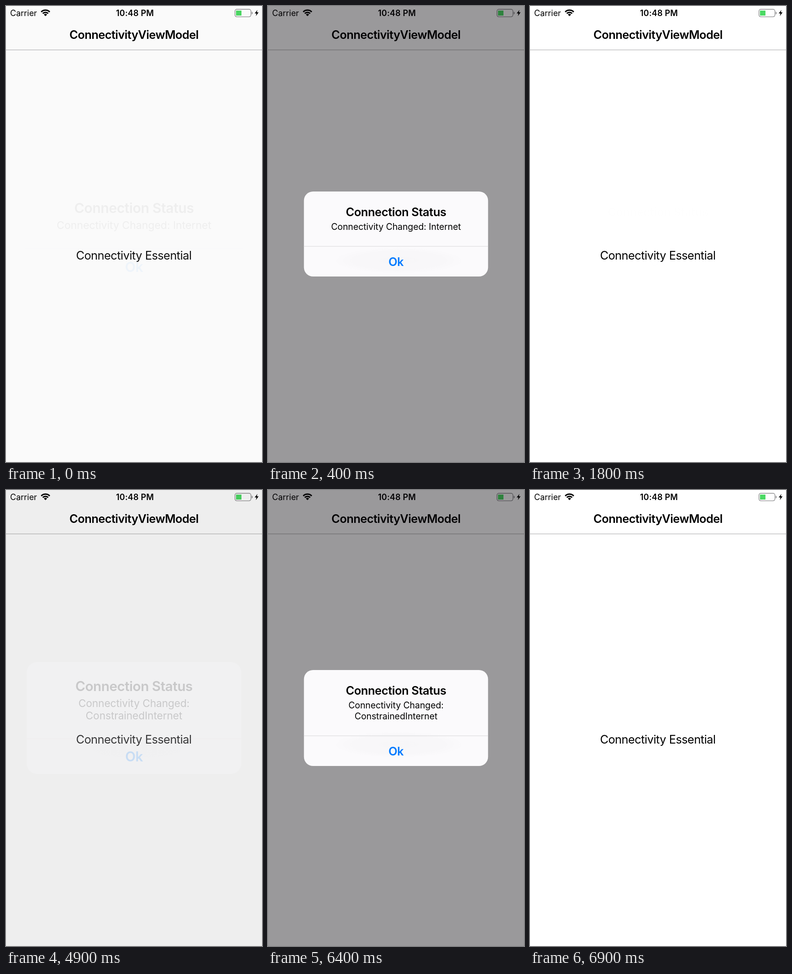
Animation of 561 by 998 pixels, one loop 8000 ms. Source, as an HTML page with a canvas:

```html
<!DOCTYPE html>
<html lang="en">
<head>
<meta charset="utf-8">
<title>Connectivity alert</title>
<style>
  html, body { margin: 0; width: 100%; height: 100%; overflow: hidden; background: #fff; }
  canvas { display: block; }
</style>
</head>
<body>
<canvas id="stage" width="561" height="998"></canvas>
<script>
const ctx = document.getElementById('stage').getContext('2d');
const W = 561, H = 998, CX = W / 2, CY = 499;
const LOOP = 8000, STEP = 100;

// Natural frequency of the critically damped alert spring, per ms
const OMEGA = 0.02285;

const ALERTS = [
  { open: -15, close: 1430, height: 186, lines: ['Connectivity Changed: Internet'] },
  { open: 4868, close: 6493, height: 210, lines: ['Connectivity Changed:', 'ConstrainedInternet'] }
];

const STYLES = {
  status: { weight: 400, size: 18, tracking: 0 },
  clock: { weight: 600, size: 18, tracking: 0.01 },
  nav: { weight: 600, size: 25.4, tracking: -0.021 },
  body: { weight: 400, size: 25.4, tracking: -0.021 },
  heading: { weight: 600, size: 25.4, tracking: -0.015 },
  message: { weight: 400, size: 19.45, tracking: -0.003 }
};

function text(str, x, y, styleName, color = '#000', align = 'center') {
  const { weight, size, tracking } = STYLES[styleName];
  ctx.font = `${weight} ${size}px Inter, sans-serif`;
  ctx.letterSpacing = `${tracking * size}px`;
  ctx.textAlign = align;
  ctx.fillStyle = color;
  ctx.fillText(str, x, y);
}

function rect(x, y, w, h, color) {
  ctx.fillStyle = color;
  ctx.fillRect(x, y, w, h);
}

function roundRect(x, y, w, h, r) {
  ctx.beginPath();
  ctx.roundRect(x, y, w, h, r);
}

// Share of the spring still to travel after ms
function remaining(ms) {
  const x = OMEGA * Math.max(0, ms);
  return (1 + x) * Math.exp(-x);
}

function drawWifi(x, y) {
  const from = -Math.PI * 0.75, to = -Math.PI * 0.25;
  ctx.strokeStyle = ctx.fillStyle = '#000';
  ctx.lineWidth = 3;
  for (const radius of [13.2, 8.3]) {
    ctx.beginPath();
    ctx.arc(x, y, radius, from, to);
    ctx.stroke();
  }
  ctx.beginPath();
  ctx.moveTo(x, y);
  ctx.arc(x, y, 5, from, to);
  ctx.fill();
}

function drawBattery() {
  ctx.strokeStyle = '#8e8e90';
  ctx.lineWidth = 1.4;
  roundRect(501.7, 7.2, 35, 16.4, 4);
  ctx.stroke();
  rect(504, 10, 12, 11, '#4cd964');
  ctx.fillStyle = '#8e8e90';
  roundRect(538.4, 12.6, 2, 5.6, [0, 2, 2, 0]);
  ctx.fill();

  const bolt = [[551, 8.5], [545, 16.3], [548.8, 16.3], [547.6, 22], [553.5, 13.8], [549.6, 13.8]];
  ctx.fillStyle = '#000';
  ctx.beginPath();
  bolt.forEach(([x, y]) => ctx.lineTo(x, y));
  ctx.fill();
}

function drawScreen() {
  rect(0, 0, W, H, '#fff');
  text('Carrier', 9, 21.7, 'status', '#000', 'left');
  drawWifi(86.5, 22.3);
  text('10:48 PM', 282.5, 21.7, 'clock');
  drawBattery();
  text('ConnectivityViewModel', CX, 72, 'nav');
  rect(0, 95.5, W, 1.2, '#b4b4b6');
  text('Connectivity Essential', 280, 555, 'body');
}

// Soft trace of the label blurred behind the card
function drawBlurredLabel() {
  ctx.save();
  ctx.translate(CX + 6, 557);
  ctx.scale(1, 0.2);
  const glow = ctx.createRadialGradient(0, 0, 0, 0, 0, 145);
  glow.addColorStop(0, 'rgba(0,0,0,0.016)');
  glow.addColorStop(0.7, 'rgba(0,0,0,0.012)');
  glow.addColorStop(1, 'rgba(0,0,0,0)');
  ctx.fillStyle = glow;
  ctx.fillRect(-145, -145, 290, 290);
  ctx.restore();
}

function drawAlert({ height, lines }, alpha, scale) {
  const width = 403.5, left = CX - width / 2;
  const top = CY - height / 2, bottom = CY + height / 2;

  rect(0, 0, W, H, `rgba(4,0,5,${0.4 * alpha})`);

  ctx.save();
  ctx.translate(CX, CY);
  ctx.scale(scale, scale);
  ctx.translate(-CX, -CY);

  // The card material turns opaque a little ahead of its content
  ctx.globalAlpha = 1 - (1 - alpha) ** 1.3;
  ctx.fillStyle = '#fbfafc';
  roundRect(left, top, width, height, 20);
  ctx.fill();

  ctx.globalAlpha = alpha;
  drawBlurredLabel();
  rect(left, bottom - 66.5, width, 1, '#d8d7da');
  text('Connection Status', CX, top + 54.3, 'heading');
  lines.forEach((line, i) => text(line, CX, top + 84 + 24 * i, 'message'));
  text('Ok', CX, bottom - 23.3, 'heading', '#007aff');
  ctx.restore();
}

function render(time) {
  drawScreen();
  for (const alert of ALERTS) {
    if (time < alert.open) continue;
    const closing = time >= alert.close;
    const left = remaining(time - (closing ? alert.close : alert.open));
    const alpha = closing ? left : 1 - left;
    if (alpha > 0.002) drawAlert(alert, alpha, closing ? 1 : 1 + 0.2 * left);
  }
}

const start = performance.now();
function tick() {
  const time = (performance.now() - start) % LOOP;
  render(Math.floor(time / STEP) * STEP);
  requestAnimationFrame(tick);
}
tick();
</script>
</body>
</html>
```
